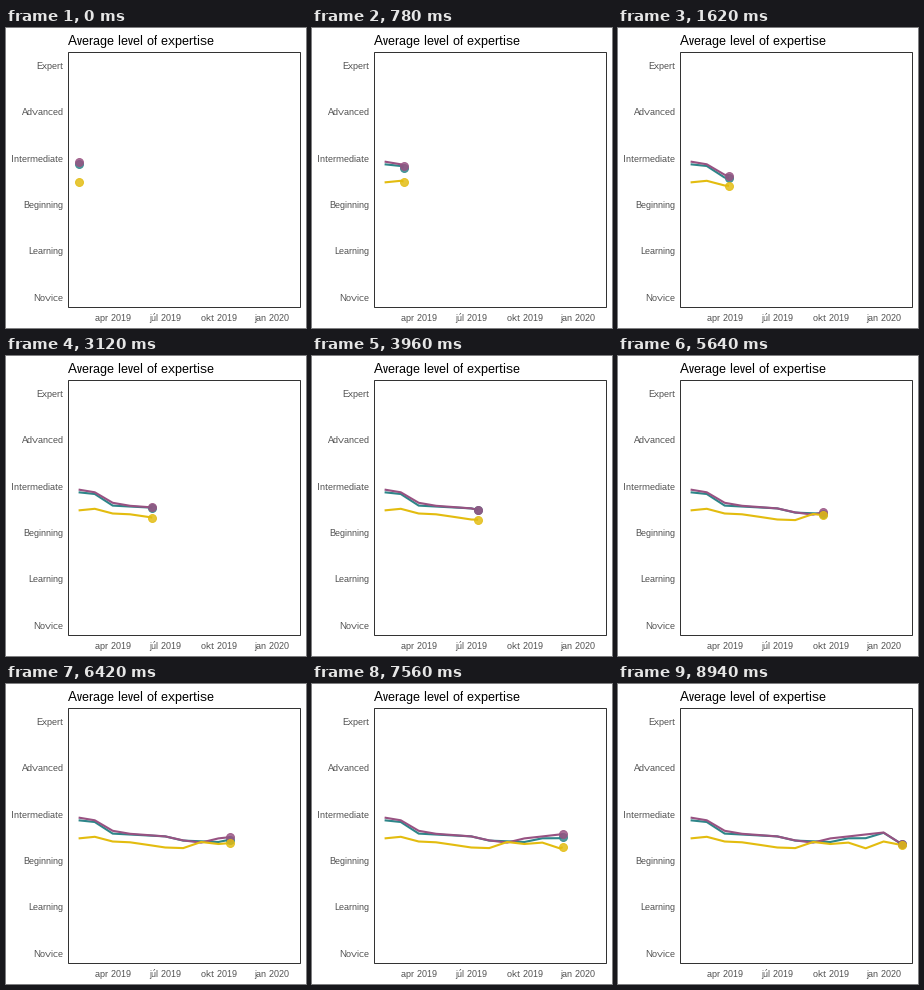
A matplotlib script that plays this animation: 300 px wide and 300 px high, repeating every 9000 ms.

```python
import numpy as np
import matplotlib.pyplot as plt
from matplotlib.animation import FuncAnimation
from matplotlib.patches import Rectangle

SIZE, DPI = 300, 100
FRAMES, INTERVAL = 150, 60
PT = 72 / DPI  # points per pixel
X0, X1 = 72.6, 283.5

# Crisp text on whole pixels
plt.rcParams.update({
    "font.family": "Liberation Sans",
    "text.hinting": "native",
    "text.hinting_factor": 1,
})

# First day of each month, counted from the start
months = np.arange("2019-02", "2020-03", dtype="datetime64[M]")
days = (months.astype("datetime64[D]") - np.datetime64("2019-02-01")).astype(int)
progress = days / days[-1]
xs = X0 + (X1 - X0) * progress
# Each month is reached on a whole frame
keys = np.round(progress * (FRAMES - 1))


def trend(*points):
    """Monthly heights, straight between the given (month, y) turning points."""
    return np.interp(np.arange(len(months)), *zip(*points))


# Drawn in this order
SERIES = {
    "#2e8589": trend((0, 136.3), (1, 138), (2, 149.6), (5, 152.4), (6, 156.6),
                     (8, 158), (9, 154.3), (10, 154.2), (11, 148.8), (12, 160)),
    "#985282": trend((0, 133.6), (1, 136.3), (2, 146.8), (3, 149.8), (5, 152.4),
                     (6, 156.4), (7, 158.6), (8, 154.4), (11, 148.5), (12, 160)),
    "#e3bc0f": trend((0, 154.4), (1, 152.8), (2, 157.5), (3, 158.3), (5, 163.5),
                     (6, 164.1), (7, 158), (8, 160), (9, 158.6), (10, 164.3),
                     (11, 157.5), (12, 161)),
}

fig = plt.figure(figsize=(SIZE / DPI, SIZE / DPI), dpi=DPI, facecolor="white")
ax = fig.add_axes([0, 0, 1, 1])
ax.set_xlim(0, SIZE)
ax.set_ylim(SIZE, 0)
ax.axis("off")


def label(x, y, text, ha, px=9, color="#4d4d4d"):
    ax.text(x, y, text, fontsize=px * PT, ha=ha, va="baseline", color=color)


label(62, 17, "Average level of expertise", "left", 13, "black")

levels = ["Expert", "Advanced", "Intermediate", "Beginning", "Learning", "Novice"]
for i, name in enumerate(levels):
    label(57.5, 40.9 + 46.36 * i, name, "right")

quarters = ["apr 2019", "júl 2019", "okt 2019", "jan 2020"]
for x, name in zip(xs[2::3], quarters):
    label(x + 0.3, 293, name, "center")

ax.add_patch(Rectangle((62.5, 24.5), 232, 255, fill=False, ec="#333333",
                       lw=PT, snap=False, zorder=5))

lines, dots = [], []
for color in SERIES:
    lines += ax.plot([], [], color=color, lw=2.1 * PT, solid_capstyle="butt",
                     solid_joinstyle="round", zorder=2)
    dots += ax.plot([], [], "o", color=color, ms=8 * PT, mew=0.95 * PT,
                    alpha=0.83, snap=False, zorder=3)


def draw(frame):
    x = np.interp(frame, keys, xs)
    done = keys < frame
    for ys, line, dot in zip(SERIES.values(), lines, dots):
        y = np.interp(frame, keys, ys)
        line.set_data(np.append(xs[done], x), np.append(ys[done], y))
        dot.set_data([x], [y])
    return lines + dots


anim = FuncAnimation(fig, draw, frames=FRAMES, interval=INTERVAL,
                     repeat=True, repeat_delay=0, blit=False)
plt.show()
```
